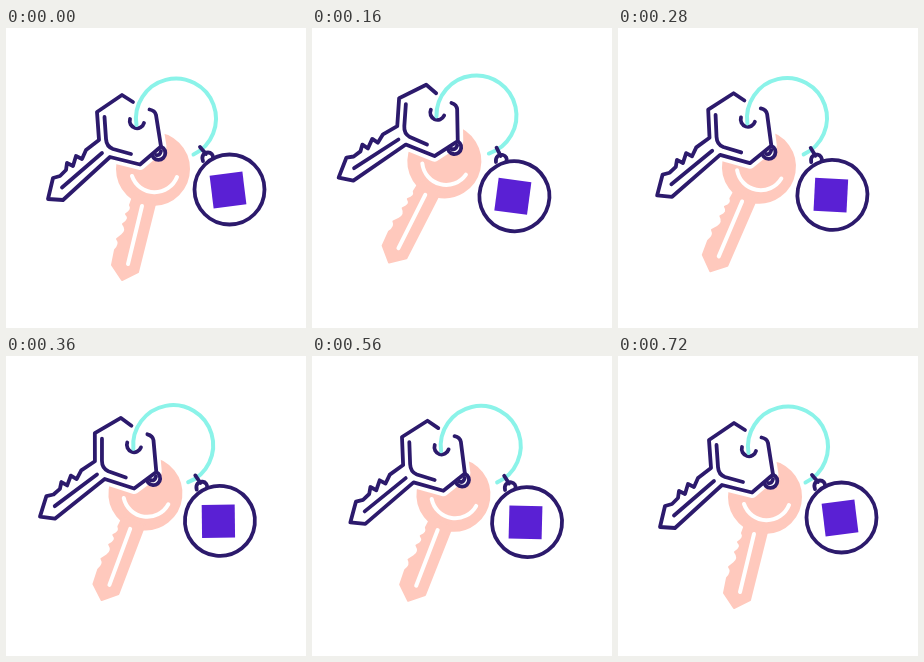
These frames come from a looping animation (300 by 300 pixels, 2.08 s). An HTML page:

```html
<!DOCTYPE html>
<html lang="en">
<head>
<meta charset="utf-8">
<title>Keys</title>
<style>
  html, body { margin: 0; width: 100%; height: 100%; overflow: hidden; background: #fff; }
  svg { display: block; width: 100vw; height: 100vh; }
  .line { fill: none; stroke: #2c1a6c; stroke-width: 3.8; stroke-linecap: round; stroke-linejoin: round; }
  .solid { fill: #fff; }
  .halo { fill: #fff; stroke: #fff; stroke-width: 11; stroke-linejoin: round; }
  .pink { fill: #ffc9bd; stroke: #ffc9bd; stroke-width: 2; stroke-linejoin: round; }
  .shine { fill: none; stroke: #fff; stroke-width: 4; stroke-linecap: round; }
  .ring { fill: none; stroke: #8bf3e9; stroke-width: 4; stroke-linecap: round; }
  .badge { fill: #5a20d4; }
</style>
</head>
<body>
<svg viewBox="0 0 300 300">
  <defs>
    <path id="outline" d="M143.500 81.500Q149 82.500 150 87L155 118.500L134 136.500L104 129L57 172L42 171L47 150L54 148L60 142L61 135L67 138L70 128L76 131L80 122L93 112L91 84L116 67L127 74"/>
  </defs>
  <g id="bunch">
    <g id="pinkKey">
      <circle class="pink" cx="147" cy="141" r="36"/>
      <path class="pink" d="M128 166L124 177Q127 182 120 186Q125 191 117 196Q122 202 116 207L111 211Q115 216 109 222L106 237L116 252L132 244L150 172Z"/>
      <path class="shine" d="M126 148A24 24 0 0 0 171 149M136 178L122 236"/>
    </g>
    <use href="#outline" class="halo"/>
    <circle class="line solid" cx="152.500" cy="125" r="6.800"/>
    <path class="line" d="M150 127Q154 128 155 123"/>
    <use href="#outline" class="line solid"/>
    <path class="line" d="M98.500 89L100 111Q100.500 118.500 107 121L125 126M96 125L56 159.500"/>
    <path class="line" d="M124 91A7.200 7.200 0 1 0 138 95"/>
    <path class="ring" d="M130.500 97A40 40 0 1 1 187.500 126.500"/>
    <g id="tag">
      <path class="line" d="M194 119L200 126M197 133C195 128 198 124.500 202 124.500C205 124.500 207.500 127 207 130"/>
      <circle class="line solid" cx="223.500" cy="161.500" r="35"/>
      <rect class="badge" x="205.500" y="145.500" width="33" height="33" transform="rotate(-7 222 162)"/>
    </g>
  </g>
</svg>
<script>
  const LOOP = 2080, STEP = 40;

  // Turning points of each swing: [ms, degrees]
  const bunchSwing = [[0, 0], [140, 8.2], [290, 1.3], [420, 6], [640, 0]];
  const pinkSwing = [[0, 0], [200, 14.5], [340, 6.2], [460, 14.5], [660, 0.6], [720, 0]];
  const tagSwing = [[0, 0], [190, 15.5], [350, 6.2], [470, 13.6], [680, 0.4], [720, 0]];

  const part = id => document.getElementById(id);
  const bunch = part("bunch"), pinkKey = part("pinkKey"), tag = part("tag");

  function angleAt(swing, t) {
    const next = swing.findIndex(point => point[0] > t);
    if (next < 0) return 0;
    const [t0, a0] = swing[next - 1], [t1, a1] = swing[next];
    const ease = (1 - Math.cos(Math.PI * (t - t0) / (t1 - t0))) / 2;
    return a0 + (a1 - a0) * ease;
  }

  function turn(el, angle, x, y) {
    el.setAttribute("transform", `rotate(${angle.toFixed(3)} ${x} ${y})`);
  }

  function draw(t) {
    const whole = angleAt(bunchSwing, t);
    turn(bunch, whole, 189, 49);
    turn(pinkKey, angleAt(pinkSwing, t) - whole, 153, 113);
    turn(tag, angleAt(tagSwing, t) - whole, 189, 122);
  }

  const start = performance.now();
  function tick() {
    const t = (performance.now() - start) % LOOP;
    draw(Math.floor(t / STEP) * STEP);
    requestAnimationFrame(tick);
  }
  draw(0);
  requestAnimationFrame(tick);
</script>
</body>
</html>
```
